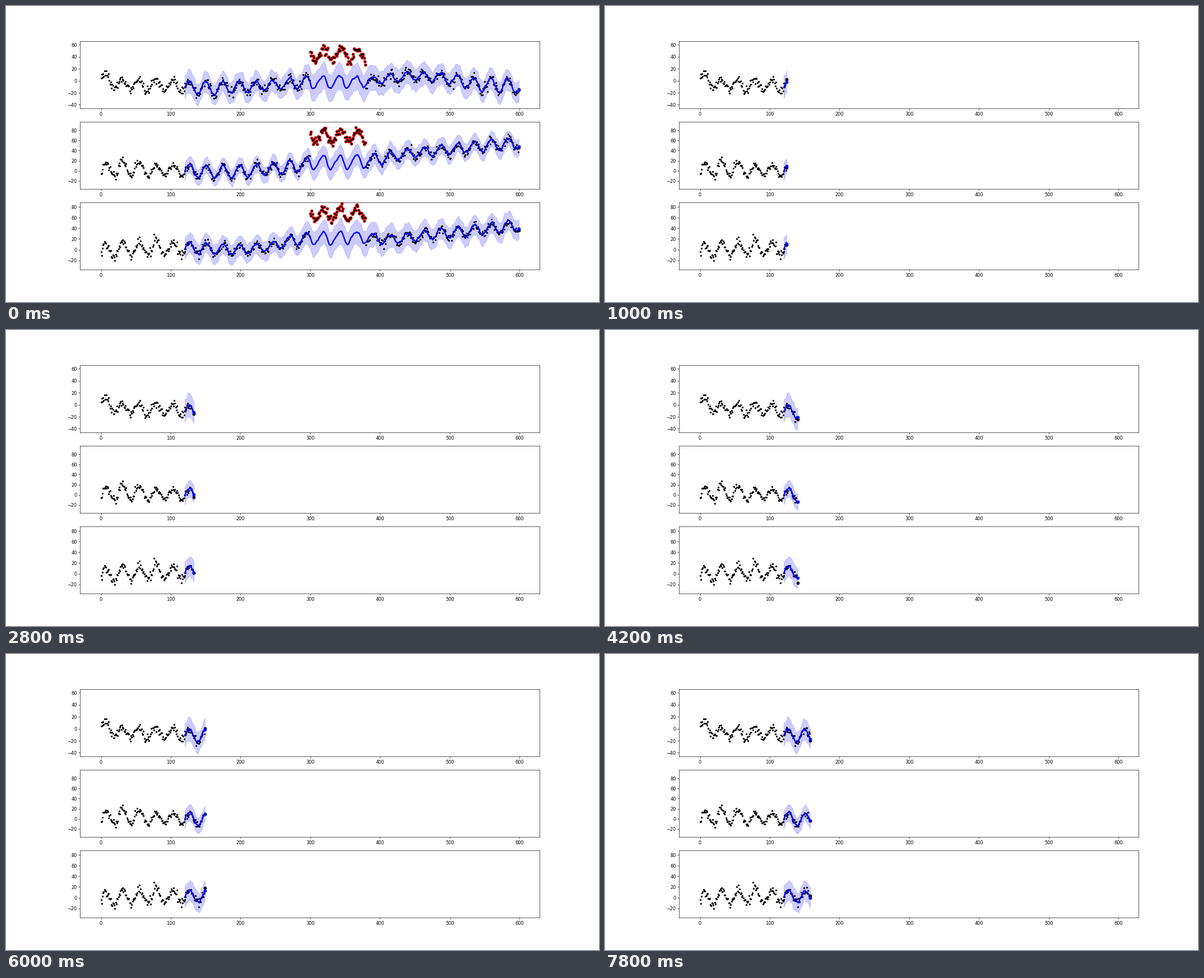
A matplotlib script for the animation above (8000 ms loop, 1058x529 px).

```python
import numpy as np
import matplotlib.pyplot as plt
from matplotlib.animation import FuncAnimation

DPI = 529 / 9
N, START, PERIOD = 600, 120, 24.05
GAP = slice(300, 380)
t = np.arange(N)

# trend: key points (time, level, swing); odd: the anomaly's level, swing, phase.
PANELS = [
    dict(ylim=(-46.4, 65.6), ticks=range(-40, 61, 20), phase=126.2, width=1,
         odd=(44, 11, 127),
         trend=[(0, 3, 10), (31, -4, 9), (55, -10, 10), (78, -6, 10),
                (120, -10, 11), (160, -12, 11), (210, -10, 9), (250, -6, 8),
                (300, -3, 11), (370, -2, 10), (400, 1, 6), (440, 9, 7),
                (490, 6, 8), (540, -6, 11), (600, -9, 12)]),
    dict(ylim=(-35.6, 96.3), ticks=range(-20, 81, 20), phase=127, width=0.92,
         odd=(69, 12, 127),
         trend=[(0, 3, 10), (31, 8, 14), (90, 1, 10), (120, 2, 13),
                (163, -3, 12), (210, 0, 12), (260, 5, 12), (306, 16, 14),
                (380, 18, 13), (428, 32, 9), (475, 39, 10), (600, 56, 11.5)]),
    dict(ylim=(-36.8, 88.4), ticks=range(-20, 81, 20), phase=127, width=1.06,
         odd=(67, 11, 126),
         trend=[(0, 0, 11), (66, 3, 14), (120, 4, 11), (187, 0, 10),
                (235, 3, 7), (282, 20, 11), (380, 23, 11), (404, 18, 8),
                (600, 46, 11)]),
]


def curves(points):
    """Interpolate each column after the first over the whole run."""
    times, *columns = zip(*points)
    return [np.interp(t, times, column) for column in columns]


# Half width of the band, and how much faster the forecast falls than it rises.
HALF, SKEW = curves([(120, 18, 0), (160, 17, 0), (280, 17, 0.3), (305, 22, 0.7),
                     (375, 22, 0.7), (410, 20, 0.3), (480, 18, 0.2), (600, 17, 0.2)])


def wave(phase, skew=0):
    angle = 2 * np.pi * (t - phase) / PERIOD
    return np.cos(angle + skew * (1 - np.cos(angle)) / 2)


def soft(rng, size):
    return size * np.convolve(rng.normal(size=N + 2), [0.5, 0.7, 0.5], "valid")


def build(spec, rng):
    """Return observations, forecast and the two band edges."""
    level, swing = curves(spec["trend"])
    mean = level + swing * wave(spec["phase"], SKEW) + soft(rng, 1)
    half = spec["width"] * HALF
    low = mean - half + soft(rng, 1.3)
    high = mean + half + soft(rng, 1.3)

    level, swing, phase = spec["odd"]
    obs = mean.copy()
    obs[GAP] = (level + swing * wave(phase))[GAP]
    obs += rng.normal(0, 4, N)
    return obs, mean, low, high


class Panel:
    def __init__(self, ax, spec, rng):
        self.obs, self.mean, self.low, self.high = build(spec, rng)
        ax.set(xlim=(-29.95, 628.95), ylim=spec["ylim"],
               xticks=range(0, 601, 100), yticks=spec["ticks"])
        self.band = ax.fill_between([START], [0], [0], color="b", alpha=0.2)
        self.rings, = ax.plot([], [], "ro")
        self.dots, = ax.plot([], [], "k.")
        self.line, = ax.plot([], [], "b-", lw=3)
        self.now, = ax.plot([], [], "ko")
        self.guess, = ax.plot([], [], "bo")

    def show(self, last):
        seen, ahead = slice(0, last + 1), slice(START, last + 1)
        self.dots.set_data(t[seen], self.obs[seen])
        self.line.set_data(t[ahead], self.mean[ahead])
        self.now.set_data([last], [self.obs[last]])
        self.guess.set_data([last], [self.mean[last]])
        x = t[ahead]
        edge = np.r_[self.low[ahead], self.high[ahead][::-1]]
        self.band.set_verts([np.c_[np.r_[x, x[::-1]], edge]])
        marked = GAP if last >= GAP.stop else slice(0, 0)
        self.rings.set_data(t[marked], self.obs[marked])


fig, axes = plt.subplots(3, 1, figsize=(18, 9), dpi=DPI)
rng = np.random.default_rng(7)
panels = [Panel(ax, spec, rng) for ax, spec in zip(axes, PANELS)]


def draw(frame):
    # The loop opens on the finished run, then starts over.
    last = START - 1 + frame if frame else N - 1
    for panel in panels:
        panel.show(last)
    return []


anim = FuncAnimation(fig, draw, frames=40, interval=200, repeat=True,
                     repeat_delay=0, init_func=lambda: draw(0))
plt.show()
```
